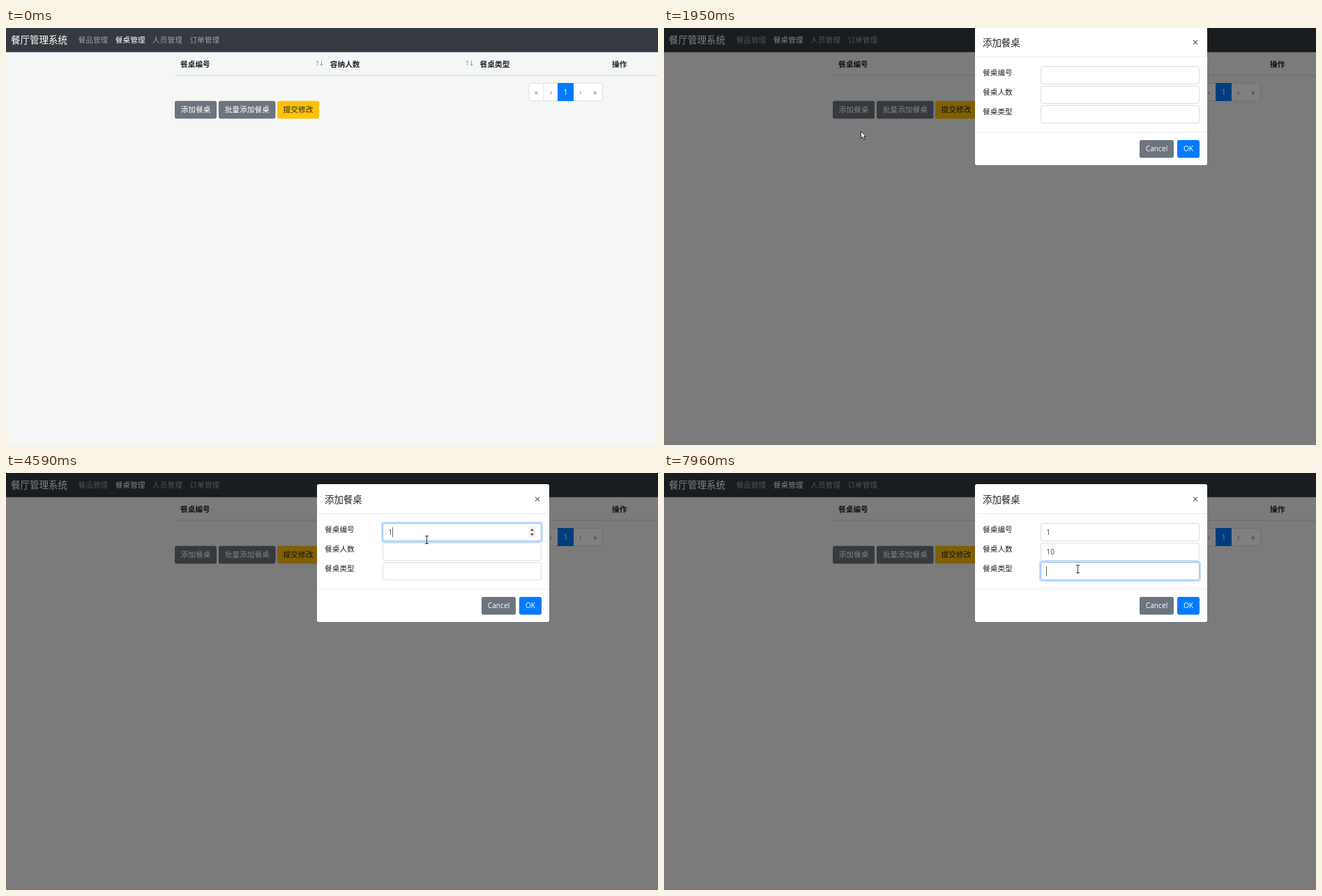
An HTML page with a canvas that plays this animation: 935 by 599 pixels, repeating every 8 s.

```html
<!DOCTYPE html>
<html lang="zh-CN">
<head>
<meta charset="utf-8">
<style>
html, body { margin: 0; width: 100%; height: 100%; overflow: hidden; background: #f5f7f6; }
canvas { display: block; }
</style>
</head>
<body>
<canvas id="stage" width="935" height="599"></canvas>
<script>
const ctx = document.getElementById('stage').getContext('2d');
const LOOP = 8000, STEP = 76, BLINK = 540;
const CLICK = 1630, OPEN = 1950;
const CJK = '"Noto Sans CJK SC", "Noto Sans CJK", sans-serif';
const LATIN = '"Open Sans", "Noto Sans", sans-serif';
const INK = '#212529', GREY = '#6c757d', BLUE = '#007bff', RULE = '#e9ecef';

const clamp = v => Math.max(0, Math.min(1, v));
const fade = (t, start) => clamp((t - start) / 150);

// Pointer legs: the pointer glides to `to` and rests there
const home = [868, 543];
const legs = [
  { from: 130, until: 850, to: [243, 128] },
  { from: 950, until: 1320, to: [283, 114] },
  { from: CLICK, until: 1860, to: [277, 148] },
  { from: OPEN, until: OPEN, to: [282, 148] },
  { from: 2030, until: 2590, to: [603, 96] },
  { from: 5290, until: 5460, to: [605, 108] },
  { from: 5760, until: 5840, to: [604, 109] },
  { from: 7320, until: 7470, to: [593, 138] }
];

// Each field is focused, typed into and left
const fields = [
  { label: '餐桌编号', on: 2740, off: 5640, value: '1', keys: [4590], spinner: true },
  { label: '餐桌人数', on: 5640, off: 7710, value: '10', keys: [6530, 6700], spinner: true },
  { label: '餐桌类型', on: 7710, off: LOOP, value: '', keys: [] }
];

function pointerAt(t) {
  let pos = home;
  for (const { from, until, to } of legs) {
    if (t < from) break;
    const steps = Math.round((until - from) / STEP) + 1;
    const k = t >= until ? 1 : clamp((Math.floor((t - from) / STEP) + 1) / steps);
    pos = pos.map((p, i) => Math.round(p + (to[i] - p) * k));
  }
  return pos;
}

function text(str, x, cy, color, { size = 10.7, weight = 400, align = 'left', latin = false } = {}) {
  ctx.font = `${weight} ${size}px ${latin ? LATIN : CJK}`;
  ctx.textAlign = align;
  ctx.fillStyle = color;
  ctx.fillText(str, x, cy + size * (latin ? 0.36 : 0.38));
}

const latinText = (str, x, cy, color, align = 'center') =>
  text(str, x, cy, color, { size: 10.2, align, latin: true });

function rect(x, y, w, h, color) {
  ctx.fillStyle = color;
  ctx.fillRect(x, y, w, h);
}

function box(x, y, w, h, fill, stroke) {
  ctx.beginPath();
  ctx.roundRect(x, y, w, h, 2.7);
  if (fill) { ctx.fillStyle = fill; ctx.fill(); }
  if (stroke) { ctx.strokeStyle = stroke; ctx.lineWidth = 1; ctx.stroke(); }
}

function ring(x, y, w, h, color) {
  ctx.beginPath();
  ctx.roundRect(x - 2, y - 2, w + 4, h + 4, 4);
  ctx.roundRect(x, y, w, h, 2.7);
  ctx.fillStyle = color;
  ctx.fill('evenodd');
}

function shape(x, y, d, fill, stroke, width = 1) {
  const p = new Path2D(d);
  ctx.save();
  ctx.translate(x, y);
  if (fill) { ctx.fillStyle = fill; ctx.fill(p); }
  if (stroke) { ctx.strokeStyle = stroke; ctx.lineWidth = width; ctx.stroke(p); }
  ctx.restore();
}

function button(label, x, y, w, fill, color = '#fff', latin = false) {
  box(x, y, w, 25.5, fill);
  if (latin) latinText(label, x + w / 2, y + 12.7, color);
  else text(label, x + w / 2, y + 12.6, color, { align: 'center' });
}

function sortIcon(x) {
  shape(x, 47, 'M0 7V0M-2 2L0 0L2 2', null, '#a3b5b3');
  shape(x + 6, 47, 'M0 0V7M-2 5L0 7L2 5', null, '#83aaa7');
}

function pager() {
  box(750, 79.5, 105.5, 25, '#fff', '#dee2e6');
  ['«', '‹', '1', '›', '»'].forEach((s, i) => {
    const mid = 760.5 + i * 21.1, active = s === '1';
    if (active) rect(791, 79, 23, 26, BLUE);
    else if (i % 3) rect(mid + (i < 2 ? -11 : 10), 80, 1, 24, '#dee2e6');
    latinText(s, mid, 92, active ? '#fff' : GREY);
  });
}

function page(focus, hover) {
  rect(0, 0, 935, 599, '#f5f7f6');
  rect(0, 0, 935, 34.7, '#343a40');
  text('餐厅管理系统', 7, 16.5, '#fff', { size: 13.5 });
  ['餐品管理', '餐桌管理', '人员管理', '订单管理'].forEach((s, i) =>
    text(s, 103.5 + i * 53.3, 16.5, i === 1 ? '#fff' : 'rgba(255,255,255,.5)'));

  ['餐桌编号', '容纳人数', '餐桌类型'].forEach((s, i) => {
    text(s, 250 + i * 214.8, 51.5, INK, { weight: 700 });
    if (i) sortIcon(231.5 + i * 215);
  });
  text('操作', 869, 51.5, INK, { weight: 700 });
  rect(242, 67.5, 693, 1.2, '#d8dee0');
  pager();

  if (focus) ring(242, 105, 60, 25, `rgba(108,117,125,${0.5 * focus})`);
  button('添加餐桌', 242, 104.7, 60, hover ? '#5a6268' : GREY);
  button('批量添加餐桌', 305, 104.7, 81.5, GREY);
  button('提交修改', 389, 104.7, 60, '#ffc107', INK);
}

function drawField(f, y, t, hover) {
  const focused = t >= f.on && t < f.off;
  const glow = fade(t, f.on) - fade(t, f.off);
  const typed = f.keys.filter(k => k <= t);
  const value = f.value.slice(0, typed.length);

  text(f.label, 457, y + 8.7, INK);
  box(540.5, y + 0.5, 227, 25, '#fff', '#d8dde2');
  if (glow > 0) {
    ctx.globalAlpha = glow;
    box(540.5, y + 0.5, 227, 25, null, '#8fc4ff');
    ring(540, y, 228, 26, 'rgba(0,123,255,.25)');
    ctx.globalAlpha = 1;
  }
  latinText(value, 548.3, y + 13, '#495057', 'left');

  const since = t - Math.max(f.on, ...typed);
  if (focused && since % (2 * BLINK) < BLINK)
    rect(548 + Math.round(value.length * 5.9), y + 6, 1, 14, '#5f656b');

  if (f.spinner && (focused || hover)) {
    rect(749.5, y + 5, 10, 15.5, '#f0f0f0');
    shape(754.5, y + 13, 'M-2.5 -2L0 -5L2.5 -2ZM-2.5 2L0 5L2.5 2Z', '#444');
  }
}

function modal(t, x, y) {
  // Slides down with an ease-out
  const shown = OPEN + Math.floor((t - OPEN) / STEP) * STEP;
  const left = 1 - clamp((shown - OPEN + 88) / 300);
  ctx.save();
  ctx.translate(0, Math.round(-33.5 * left * left));
  box(446, 16, 333, 198, '#fff');
  text('添加餐桌', 457, 37.9, INK, { size: 13.4 });
  shape(762, 37.5, 'M-3 -3L3 3M3 -3L-3 3', null, '#7f7f7f', 1.6);
  rect(446, 58, 333, 1, RULE);
  rect(446, 166.5, 333, 1, RULE);
  fields.forEach((f, i) => {
    const top = 72 + i * 28;
    drawField(f, top, t, x > 540 && x < 768 && y > top && y < top + 26);
  });
  button('Cancel', 682, 178, 49, GREY, '#fff', true);
  button('OK', 736, 178, 32, BLUE, '#fff', true);
  ctx.restore();
}

const cursors = {
  arrow: (x, y) => shape(x, y, 'M.5 .5V10.5L2.8 8.4L4.5 12.2L6.2 11.4L4.6 7.8L7.8 7.6Z', '#fff', '#111', 0.9),
  hand: (x, y) => shape(x, y, 'M-1 .7H.8V4.5L5.5 5.5L6 9L4.8 12.5H-.5L-3 8.5L-2.6 7.2L-1 8.3Z', '#fff', '#111', 0.9),
  beam: (x, y) => shape(x + 0.5, y, 'M0 -5V5M-2.5 -5.5H2.5M-2.5 5.5H2.5', null, '#3a3a3a')
};

function draw(t) {
  const [x, y] = pointerAt(t);
  const open = t >= OPEN;
  const onButton = !open && t > 950 && x >= 242 && x <= 302 && y >= 105 && y <= 130;
  page(open ? 0 : fade(t, CLICK), onButton);
  if (open) {
    rect(0, 0, 935, 599, 'rgba(0,0,0,.5)');
    modal(t, x, y);
  }
  if (t >= legs[0].from)
    cursors[onButton ? 'hand' : open && x > 540 ? 'beam' : 'arrow'](x, y);
}

const start = performance.now();
function tick() {
  draw((performance.now() - start) % LOOP);
  requestAnimationFrame(tick);
}
tick();
</script>
</body>
</html>
```
